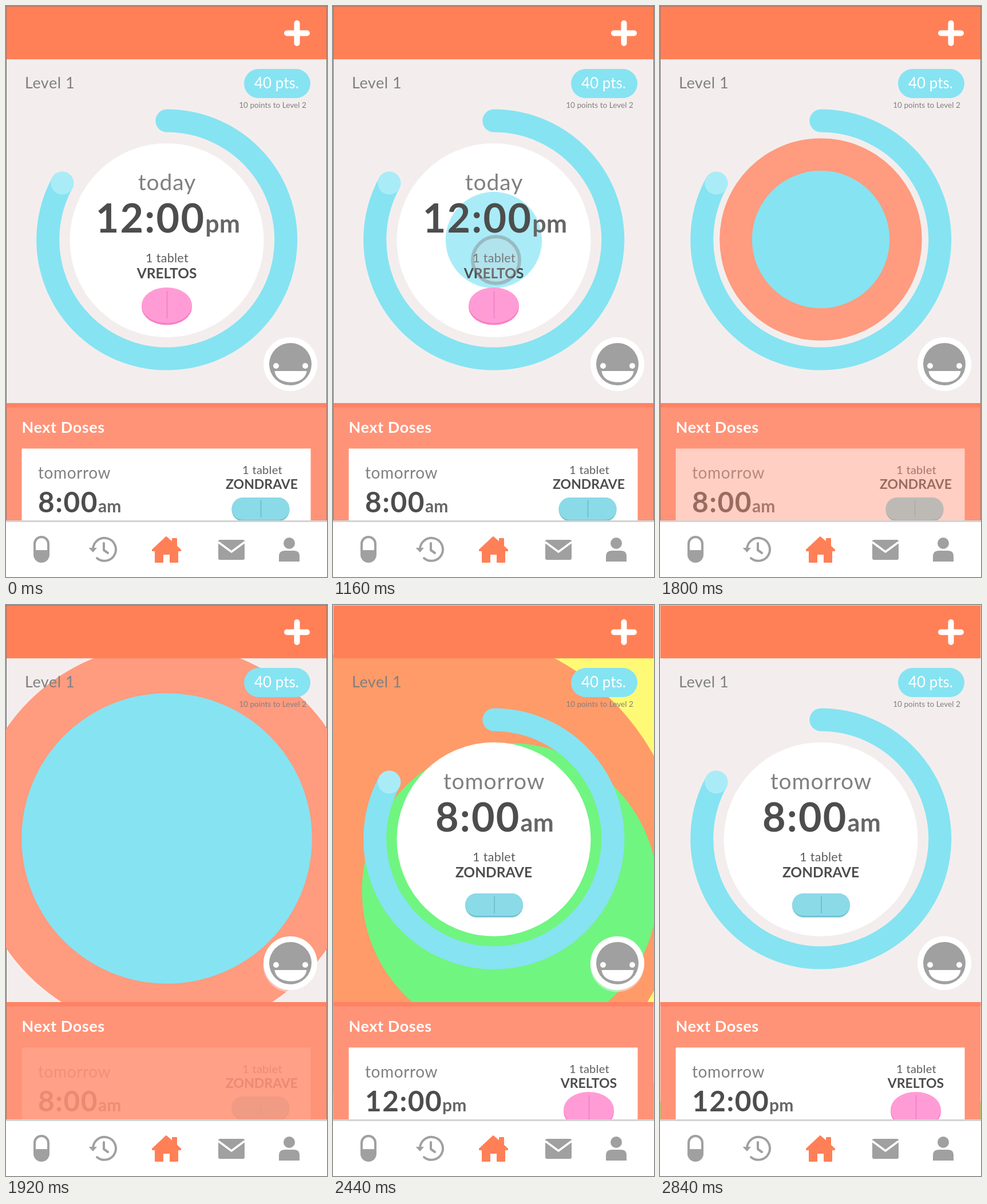
These frames come from a looping animation (561x998 px, 3.04 s). An HTML page:

```html
<!DOCTYPE html>
<html lang="en">
<head>
<meta charset="utf-8">
<title>Dose reminder</title>
<style>
  html, body { margin: 0; width: 100%; height: 100%; overflow: hidden; background: #333; }
  svg { display: block; width: 561px; height: 998px; font-family: Lato, "Open Sans", sans-serif; fill: #808080; }
  .mid { text-anchor: middle; }
  .day { font-size: 39px; letter-spacing: .9px; }
  .time { font-size: 70px; font-weight: 700; letter-spacing: 2.2px; fill: #4d4d4d; }
  .time tspan { font-size: 43px; letter-spacing: .3px; fill: #666; }
  .qty { font-size: 21.5px; letter-spacing: .3px; fill: #5c5c5c; }
  .name { font-size: 24.5px; font-weight: 700; fill: #4d4d4d; }
  .card .day { font-size: 28px; letter-spacing: .6px; }
  .card .time { font-size: 49.5px; letter-spacing: 1.5px; }
  .card .time tspan { font-size: 30px; letter-spacing: .2px; }
  .card .qty { font-size: 20px; }
  .card .name { font-size: 23px; }
  .icon { fill: #a0a0a0; }
  .line { fill: none; stroke: #a0a0a0; stroke-width: 4; stroke-linecap: round; stroke-linejoin: round; }
</style>
</head>
<body>
<svg viewBox="0 0 561 998">
  <defs>
    <g id="ring" transform="translate(.3 -.4)">
      <path d="M281 201A208 208 0 1 1 98 310" fill="none" stroke="#86e3f2" stroke-width="40" stroke-linecap="round"/>
      <circle cx="98" cy="310" r="20" fill="#a9ecf8"/>
    </g>
    <g id="pink">
      <ellipse cy="34.5" rx="44" ry="31" fill="#f97fc6"/>
      <ellipse cy="31" rx="44" ry="31" fill="#ff9cd6"/>
      <path d="M.5 6V54" stroke="#f283c8" stroke-width="2"/>
    </g>
    <g id="blue">
      <rect x="-50.5" y="1" width="101" height="41" rx="20.5" fill="#74c3d2"/>
      <rect x="-50.5" width="101" height="39" rx="19.5" fill="#8bdae8"/>
      <path d="M.5 5V35" stroke="#72c0cf" stroke-width="2"/>
    </g>
    <clipPath id="hole"><circle id="holeDisc"/></clipPath>
    <clipPath id="list"><rect x="0" y="701" width="561" height="198"/></clipPath>
  </defs>

  <rect width="561" height="998" fill="#3c3a3a"/>
  <rect x=".7" y=".7" width="559.6" height="997" fill="#f3eeed"/>

  <use href="#ring"/>
  <circle cx="281" cy="409.5" r="169.5" fill="#fff"/>
  <circle id="press" cx="281" cy="409" fill="#a9ecf8"/>
  <g class="mid">
    <text class="day" x="281.5" y="322">today</text>
    <text class="time" x="283" y="396">12:00<tspan>pm</tspan></text>
    <text class="qty" x="281.5" y="448">1 tablet</text>
    <text class="name" x="281" y="476">VRELTOS</text>
    <use href="#pink" x="281" y="492"/>
  </g>
  <circle id="touch" cx="285" cy="444" r="41" fill="#c8c8c8" fill-opacity=".25" stroke="#6e5f5f" stroke-opacity=".32" stroke-width="6"/>

  <g id="bursts"></g>

  <use id="ringNext" href="#ring"/>
  <g id="doseNext" class="mid" clip-path="url(#hole)">
    <rect x="100" y="230" width="362" height="360" fill="#fff"/>
    <text class="day" x="281.5" y="322">tomorrow</text>
    <text class="time" x="282.5" y="396">8:00<tspan>am</tspan></text>
    <text class="qty" x="281.5" y="448">1 tablet</text>
    <text class="name" x="281" y="476">ZONDRAVE</text>
    <use href="#blue" x="281.5" y="504"/>
  </g>

  <text x="33" y="144" font-size="27" letter-spacing=".5">Level 1</text>
  <rect x="416" y="110" width="116" height="51" rx="25.5" fill="#86e3f2"/>
  <text class="mid" x="473" y="144" font-size="26" fill="#fff">40 pts.</text>
  <text class="mid" x="466" y="178" font-size="13.6">10 points to Level 2</text>

  <circle cx="496.5" cy="629.5" r="47" fill="#f3eeed" fill-opacity=".5"/>
  <circle cx="497" cy="626" r="47" fill="#fff"/>
  <circle class="icon" cx="497" cy="626" r="37"/>
  <g fill="#fff">
    <circle cx="472" cy="629" r="5"/>
    <circle cx="523" cy="629" r="5"/>
    <path d="M469.5 638H525.5C524 651 512 657.5 497.5 657.5S471 651 469.5 638Z"/>
  </g>

  <rect x=".7" y=".7" width="559.6" height="92.5" fill="#ff8057"/>
  <path d="M508.5 30V65M491 47.5H526" stroke="#fff" stroke-width="10" stroke-linecap="round"/>

  <rect x=".7" y="694" width="559.6" height="206" fill="#ff9377"/>
  <rect x=".7" y="694" width="559.6" height="7.5" fill="#ff8264"/>
  <text x="27.5" y="746" font-size="27" font-weight="700" letter-spacing=".6" fill="#fff">Next Doses</text>
  <g class="card" clip-path="url(#list)">
    <g id="cardNow">
      <rect x="27.5" y="773.5" width="505" height="140" fill="#fff"/>
      <text class="day" x="56" y="826">tomorrow</text>
      <text class="time" x="56" y="885">8:00<tspan>am</tspan></text>
      <text class="qty mid" x="448" y="818">1 tablet</text>
      <text class="name mid" x="447" y="844">ZONDRAVE</text>
      <use href="#blue" x="445" y="859"/>
    </g>
    <g id="cardNext">
      <rect x="27.5" y="773.5" width="505" height="140" fill="#fff"/>
      <text class="day" x="56" y="826">tomorrow</text>
      <text class="time" x="56" y="885">12:00<tspan>pm</tspan></text>
      <text class="qty mid" x="448" y="818">1 tablet</text>
      <text class="name mid" x="447" y="844">VRELTOS</text>
      <use href="#pink" x="447" y="851"/>
    </g>
  </g>

  <rect y="899" width="561" height="99" fill="#fff"/>
  <rect y="899" width="561" height="3" fill="#d3d3d3"/>
  <g class="icon">
    <rect x="48" y="926" width="28" height="47" rx="14"/>
    <path d="M52 951V940a10 10 0 0 1 20 0V951Z" fill="#fff"/>
    <path class="line" d="M152 950A20 20 0 1 1 159 965M171 939V951L178 956"/>
    <path d="M144.5 947H159L152 955Z"/>
    <path d="M280 928L291 937.500V931H298V944L305 950.5V952H300V972H287V958H274V972H261V952H256V950.5Z" fill="#ff8057" stroke="#ff8057" stroke-width="2" stroke-linejoin="round"/>
    <rect x="371" y="933" width="46" height="35" rx="3"/>
    <path d="M371 937L394 954L417 937" fill="none" stroke="#fff" stroke-width="3.5" stroke-linejoin="round"/>
    <circle cx="495" cy="939" r="10"/>
    <path d="M477 971V962Q477 952 487 952H503Q513 952 513 962V971Z"/>
  </g>
</svg>
<script>
  const LOOP = 3040, STEP = 40;
  const $ = id => document.getElementById(id);
  const clamp = (v, lo = 0, hi = 1) => Math.min(hi, Math.max(lo, v));
  const span = (t, from, length) => clamp((t - from) / length);
  const sine = p => (1 - Math.cos(Math.PI * p)) / 2;
  const easeOut = p => 1 - (1 - p) ** 3;
  const show = (el, on) => { el.style.display = on ? "" : "none"; };

  // fill, centre, start in ms, speed in px per ms, largest radius
  const bursts = [
    ["#ff9b7f", 281, 408, 1670, 1.36, 520],
    ["#86e3f2", 281, 408, 1692, 1.113, 600],
    ["#fffa76", 281, 409, 2172, 1.9, 538],
    ["#ff9b69", 188, 469, 2216, 1.9, 538],
    ["#70f580", 309, 500, 2304, 1.9, 538],
    ["#f3eeed", 281, 409, 2557, 1.9, 538]
  ].map(([fill, cx, cy, start, speed, max]) => {
    const el = document.createElementNS("http://www.w3.org/2000/svg", "circle");
    for (const [k, v] of Object.entries({ fill, cx, cy })) el.setAttribute(k, v);
    $("bursts").append(el);
    return { el, start, speed, max };
  });

  function draw(t) {
    $("press").setAttribute("r", t < 360 ? 0 : 140 * sine(span(t, 262, 1590)));
    $("touch").style.opacity = span(t, 320, 160) - span(t, 1640, 120);

    for (const b of bursts) b.el.setAttribute("r", clamp((t - b.start) * b.speed, 0, b.max));

    const grow = easeOut(span(t, 2040, 280));
    const disc = $("holeDisc");
    disc.setAttribute("r", 169.5 * grow);
    disc.setAttribute("cx", 281 - 12 * (1 - grow));
    disc.setAttribute("cy", 409.5);
    show($("doseNext"), t > 2040);
    show($("ringNext"), t >= 2200);

    $("cardNow").style.opacity = 1 - span(t, 1680, 272);
    const rise = 126 * (1 - easeOut(span(t, 2000, 280)));
    $("cardNext").setAttribute("transform", `translate(0 ${rise})`);
    show($("cardNext"), t > 2000);
  }

  const begin = performance.now();
  function tick() {
    const t = (performance.now() - begin) % LOOP;
    draw(Math.floor(t / STEP) * STEP);
    requestAnimationFrame(tick);
  }
  tick();
</script>
</body>
</html>
```
